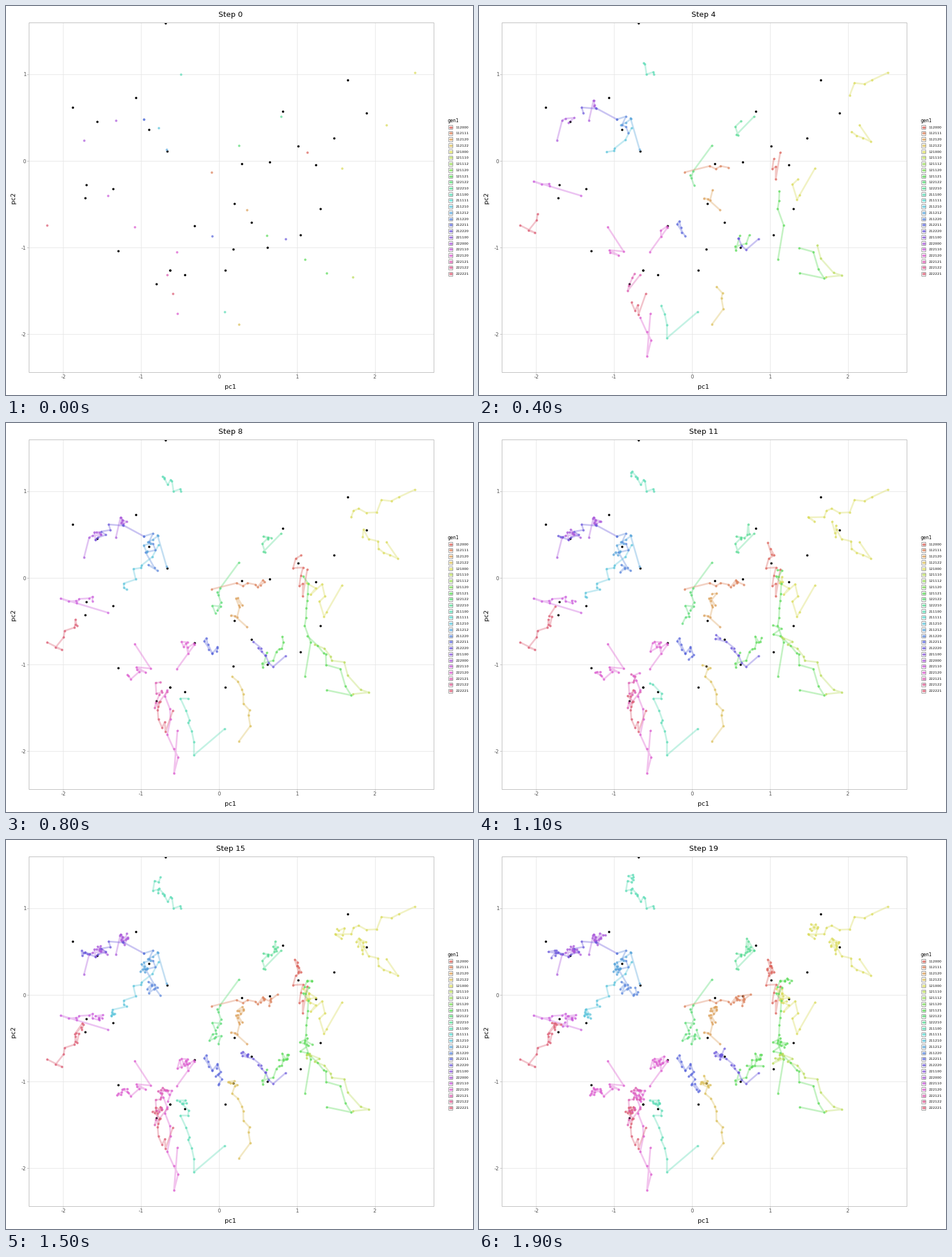
A matplotlib script that plays this animation: 820x683 px, repeating every 2000 ms.

```python
import colorsys

import matplotlib.pyplot as plt
import numpy as np
from matplotlib.animation import FuncAnimation
from matplotlib.patches import Rectangle

W, H, DPI = 820, 683, 64
PX = 72 / DPI
STEPS = 20
SETTLE = 11
LEVELS = ("112000 112111 112120 112122 121000 121110 121112 121120 121121 "
          "122122 122210 211100 211111 211210 211212 211220 212211 212220 "
          "221100 222000 222110 222120 222121 222122 222221").split()
LEFT, TOP, RIGHT, BOTTOM = 39.5, 28.5, 750.5, 642.5

plt.rcParams["font.family"] = "DejaVu Sans"
fig = plt.figure(figsize=(W / DPI, H / DPI), dpi=DPI, facecolor="white")
ax = fig.add_axes([0, 0, 1, 1])
ax.set_xlim(0, W)
ax.set_ylim(H, 0)
ax.axis("off")

panel = Rectangle((LEFT, TOP), RIGHT - LEFT, BOTTOM - TOP, fill=False,
                  ec="#bdbdbd", lw=PX, zorder=6)
ax.add_patch(panel)


def hue(level):
    return colorsys.hls_to_rgb((0.01 + level / len(LEVELS)) % 1, 0.6, 0.65)


def label(x, y, text, size, color="black", **kw):
    kw = {"ha": "center", "va": "center_baseline", **kw}
    return ax.text(x, y, text, fontsize=size * PX, color=color, **kw)


def stroke(x, y, color, width, **kw):
    return ax.plot(x, y, color=color, lw=width * PX, **kw)[0]


def dots(x, y, color, size=4.0, **kw):
    return ax.plot(x, y, "o", color=color, ms=size * PX, mew=0, **kw)[0]


def draw_grid():
    for v in range(-2, 3):
        x = 374 + 136.8 * v
        stroke([x, x], [TOP, BOTTOM], "#e5e5e5", 0.9, zorder=1)
        stroke([x, x], [BOTTOM, BOTTOM + 2.5], "#bdbdbd", 0.9, zorder=1)
        label(x, 651, str(v), 8.8, "#4d4d4d")
    for v in range(-2, 2):
        y = 272 - 152.2 * v
        stroke([LEFT, RIGHT], [y, y], "#e5e5e5", 0.9, zorder=1)
        stroke([LEFT - 2.5, LEFT], [y, y], "#bdbdbd", 0.9, zorder=1)
        label(35.5, y, str(v), 8.8, "#4d4d4d", ha="right")
    label(394.5, 668.3, "pc1", 11)
    label(13, 337, "pc2", 11, rotation=90, va="center")


def draw_legend():
    label(776, 200, "gen1", 7.8, ha="left")
    for i, name in enumerate(LEVELS):
        y = 212.7 + 10.73 * i
        stroke([777, 784.5], [y, y], hue(i), 3, alpha=0.35,
               solid_capstyle="butt")
        dots([780.7], [y], hue(i), 4.6, alpha=0.7)
        ax.add_patch(Rectangle((777, y - 3.7), 7.4, 7.4, fill=False,
                               ec="#7f7f7f", lw=0.8 * PX, zorder=5))
        label(789.5, y, name, 6, ha="left")


rng = np.random.RandomState(5)
trails = []


def trail(level, start, jump, settle, optimum):
    """Leap from start, ease to the settling place, then wander to the optimum."""
    start, jump, settle, optimum = map(np.array, (start, jump, settle, optimum))
    t = np.arange(STEPS)[:, None]
    ease = 1 - (1 - np.clip((t - 1) / (SETTLE - 1), 0, 1)) ** 1.5
    drift = 0.4 * np.clip((t - SETTLE) / 5, 0, 1)
    walk = jump + (settle - jump) * ease + (optimum - settle) * drift
    walk[2:] += rng.normal(0, 5.5, (STEPS - 2, 2))
    walk[0] = start
    line = stroke([], [], hue(level), 3, alpha=0.35, zorder=3,
                  solid_capstyle="butt", solid_joinstyle="round")
    marks = dots([], [], hue(level), 4.2, alpha=0.7, zorder=4)
    dots(*optimum[:, None], "black", 4, zorder=2).set_clip_path(panel)
    trails.append((walk, line, marks))


draw_grid()
draw_legend()

# Upper left
trail(19, (137, 236), (146, 201), (172, 190), (160, 203))
trail(19, (193, 201), (201, 166), (207, 172), (227.5, 160.5))
trail(17, (242, 199), (205, 179), (141, 203), (116.5, 177.5))
trail(15, (242, 199), (258, 194), (258, 268), (282.5, 255))
trail(13, (268, 214), (257, 235), (188, 304), (188, 320.5))
trail(14, (282, 252), (266, 197), (239, 229), (251, 217))
trail(11, (307, 120), (306, 116), (267, 88), (280, 29.8))

# Lower left
trail(20, (179, 333), (96, 308), (166, 310), (138.5, 336.5))
trail(24, (72, 385), (98, 398), (127, 331), (141, 314))
trail(21, (226, 388), (254, 431), (205, 444), (196.5, 430))
trail(21, (300, 432), (331, 389), (306, 392), (330.5, 386))
trail(21, (301, 540), (295, 615), (278, 443), (288, 464))
trail(24, (293, 505), (280, 542), (264, 474), (264, 488))
trail(22, (283, 472), (261, 500), (272, 443), (288, 464))

# Centre
trail(16, (362, 404), (348, 383), (374, 412), (385, 463.5))
trail(9, (409, 245), (376, 290), (366, 345), (400.5, 346.5))
trail(1, (361, 292), (405, 281), (468, 284), (463, 274))
trail(2, (423, 358), (402, 339), (411, 303), (414, 276.5))
trail(10, (483, 194), (452, 226), (468, 190), (486, 185))
trail(11, (384, 537), (330, 583), (314, 458), (313.5, 472))
trail(3, (409, 559), (429, 532), (398, 427), (398.5, 426.5))

# Right
trail(0, (529, 257), (521, 304), (510, 216), (513, 245.5))
trail(4, (590, 285), (563, 332), (525, 272), (543.5, 278.5))
trail(4, (668, 209), (688, 238), (620, 178), (633, 187.5))
trail(4, (718, 117), (690, 130), (583, 164), (600, 130))
trail(8, (525, 445), (535, 385), (525, 254), (576, 232))
trail(8, (458, 403), (451, 429), (493, 376), (459, 424))
trail(17, (491, 409), (469, 428), (418, 375), (431, 380))
trail(8, (563, 469), (606, 478), (522, 355), (551.5, 356))
trail(5, (609, 476), (637, 473), (532, 372), (517, 402))

title = label(394.5, 13.7, "", 13.1)


def update(step):
    title.set_text(f"Step {step}")
    for walk, line, marks in trails:
        x, y = walk[:step + 1].T
        line.set_data(x, y)
        marks.set_data(x, y)
    return []


anim = FuncAnimation(fig, update, frames=STEPS, interval=100,
                     repeat=True, repeat_delay=0, blit=False)
plt.show()
```
